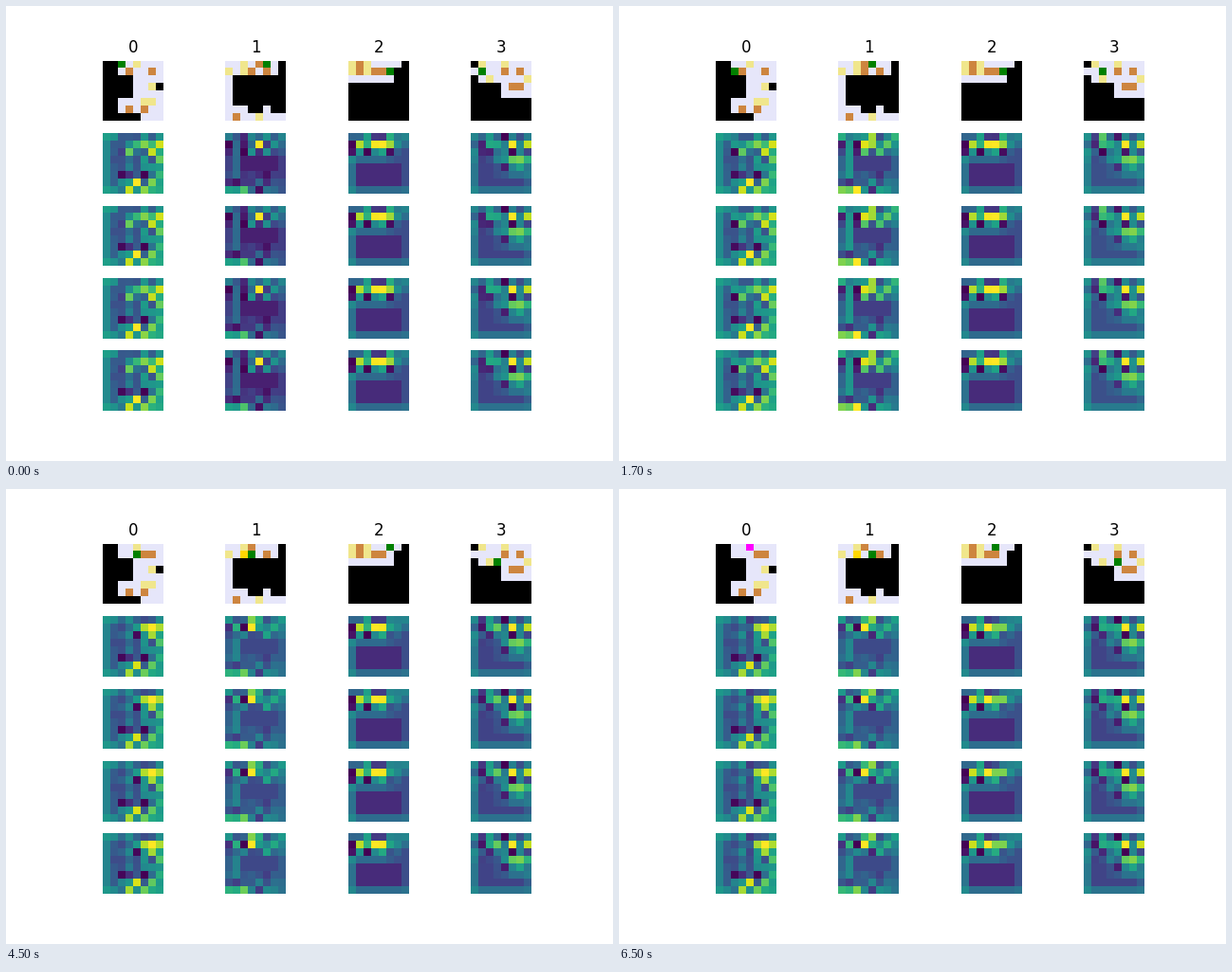
Recreate the animation shown at these times as a matplotlib script. Size 640 px wide and 480 px high, loop 8 s.

```python
import numpy as np
import matplotlib.pyplot as plt
from matplotlib.animation import FuncAnimation
from matplotlib.colors import to_rgb

SIZE = 8
LAYERS = 4
BIAS = 0.57
MOVES = dict(stay=(0, 0), up=(-1, 0), down=(1, 0), left=(0, -1), right=(0, 1))
ROW, COL = np.indices((SIZE, SIZE))


class Puzzle:
    """A box-pushing level whose walls follow a rule over rows and columns."""

    def __init__(self, wall, goals, boxes, player, moves):
        self.wall = wall.astype(float)
        self.goals, self.boxes, self.player = goals, boxes, player
        self.moves = moves.split()

    def state(self, step):
        (r, c), boxes = self.player, set(self.boxes)
        for move in self.moves[:step]:
            dr, dc = MOVES[move]
            r, c = r + dr, c + dc
            if (r, c) in boxes:
                boxes.remove((r, c))
                boxes.add((r + dr, c + dc))
        return dict(wall=self.wall, floor=1 - self.wall, goal=mask(self.goals),
                    box=mask(boxes), player=mask([(r, c)]))


def mask(cells):
    grid = np.zeros((SIZE, SIZE))
    for cell in cells:
        grid[cell] = 1
    return grid


def kernel(centre, side, rise, corner, lean):
    """3x3 filter: level beside and at corners, sloping up and to the left."""
    dy, dx = np.indices((3, 3)) - 1
    level = np.where(dx * dy != 0, corner,
                     np.where(dx != 0, side, -rise * dy))
    return np.where((dx == 0) & (dy == 0), centre, level - lean * dx)


# Floor lies under everything but walls, so the other filters add to it.
KERNELS = dict(
    wall=kernel(centre=-.04, side=.035, rise=0, corner=-.1, lean=-.02),
    floor=kernel(centre=-.14, side=.075, rise=.04, corner=-.02, lean=.01),
    goal=kernel(centre=-.28, side=.05, rise=-.15, corner=-.04, lean=.06),
    box=kernel(centre=.12, side=.3, rise=.25, corner=-.07, lean=.07),
    player=kernel(centre=.05, side=0, rise=-.2, corner=-.02, lean=0),
)

PUZZLES = [
    Puzzle((COL < 2) | (COL < 4) & (abs(ROW - 3) < 2)
           | (ROW == 7) & (COL < 5) | (ROW == 3) & (COL == 7),
           goals=[(0, 4), (3, 6), (5, 5), (5, 6)],
           boxes=[(1, 3), (1, 6), (6, 3), (6, 5)],
           player=(0, 2), moves="down right right up"),
    Puzzle((COL > 0) & (ROW > 1) & (ROW < 6) | (COL == 7) & (ROW < 2)
           | (ROW == 6) & (COL > 2) & (COL != 5),
           goals=[(0, 2), (1, 0), (1, 2), (7, 4)],
           boxes=[(0, 4), (1, 3), (1, 5), (7, 1)],
           player=(0, 5), moves="left down left right"),
    Puzzle((ROW > 2) | (COL > 6) | (COL == 6) & (ROW > 0),
           goals=[(0, 0), (0, 2), (1, 0), (1, 2)],
           boxes=[(0, 1), (1, 1), (1, 3), (1, 4)],
           player=(1, 5), moves="stay stay up left"),
    Puzzle((ROW > 4) | (ROW > 2) & (COL < 4) | (COL == 0) & (ROW % 2 == 0),
           goals=[(0, 1), (0, 4), (2, 2), (2, 7)],
           boxes=[(1, 4), (1, 6), (3, 5), (3, 6)],
           player=(1, 1), moves="right right down right"),
]


def paint(state):
    image = np.zeros((SIZE, SIZE, 3))
    floor, goal, box, player = (
        state[kind] > 0 for kind in ("floor", "goal", "box", "player"))
    for where, color in [(floor, "lavender"), (goal, "khaki"), (box, "peru"),
                         (box & goal, "gold"), (player, "green"),
                         (player & goal, "magenta")]:
        image[where] = to_rgb(color)
    return image


def activate(state):
    heat = np.full((SIZE, SIZE), BIAS)
    for kind, weights in KERNELS.items():
        padded = np.pad(state[kind], 1)
        for (r, c), weight in np.ndenumerate(weights):
            heat += weight * padded[r:r + SIZE, c:c + SIZE]
    return heat


fig, axes = plt.subplots(LAYERS + 1, len(PUZZLES), figsize=(6.4, 4.8), dpi=100)
images = np.empty(axes.shape, dtype=object)
for (row, col), ax in np.ndenumerate(axes):
    ax.axis("off")
    start = PUZZLES[col].state(0)
    images[row, col] = ax.imshow(activate(start) if row else paint(start))
    if row == 0:
        ax.set_title(str(col))


def update(frame):
    step = (frame + 3) // 4
    for col, puzzle in enumerate(PUZZLES):
        state = puzzle.state(step)
        images[0, col].set_data(paint(state))
        heat = activate(state)
        for image in images[1:, col]:
            image.set_data(heat)
            image.set_clim(heat.min(), heat.max())
    return list(images.flat)


anim = FuncAnimation(fig, update, frames=16, interval=500, repeat=True,
                     repeat_delay=0, blit=False)
plt.show()
```
